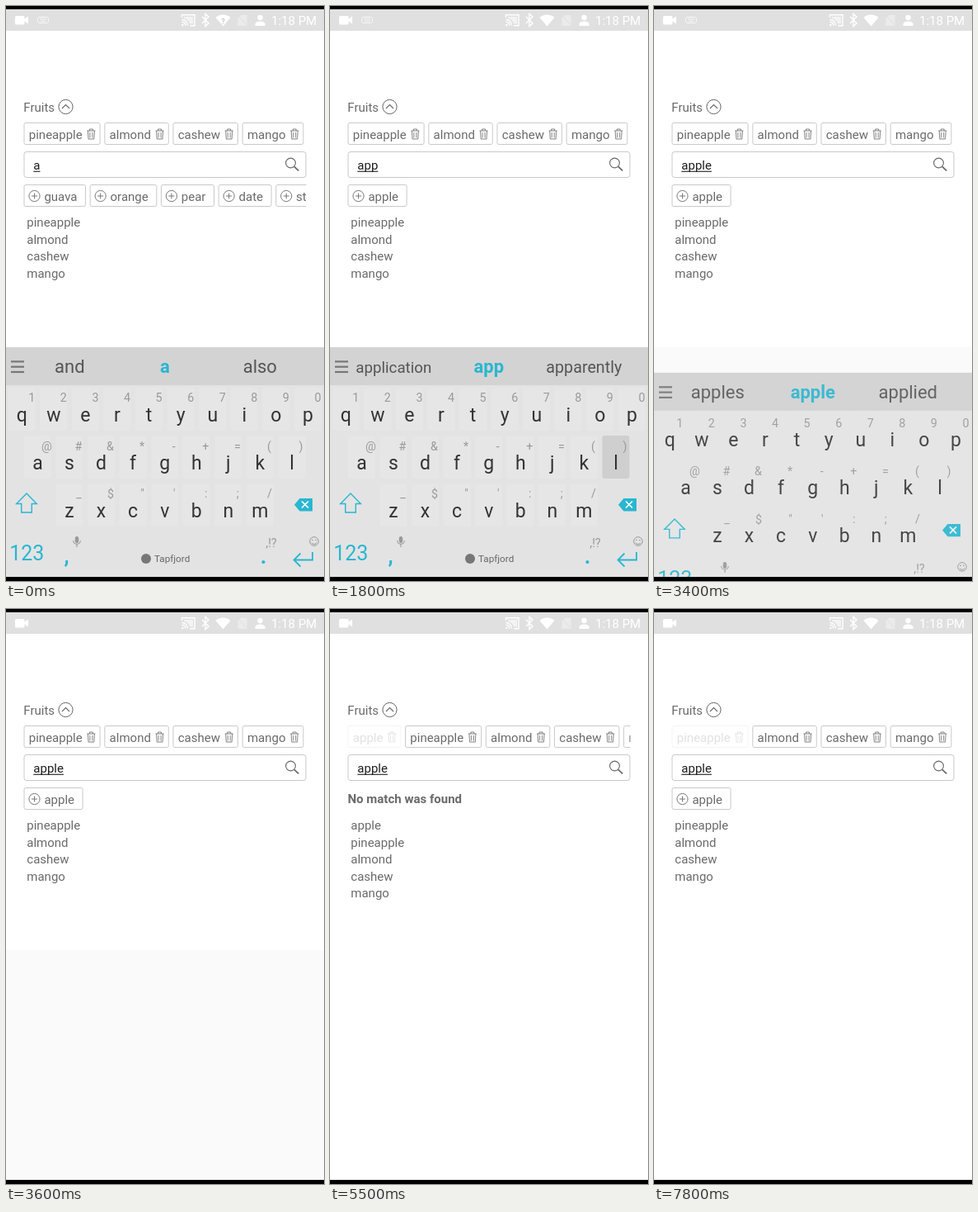
Recreate the animation shown at these times as an HTML page with a canvas. Size 386x696 px, loop 8 s.

```html
<!DOCTYPE html>
<html lang="en">
<head>
<meta charset="utf-8">
<title>Fruit picker</title>
<style>
html, body { margin: 0; width: 100%; height: 100%; overflow: hidden; background: #fff; }
canvas { display: block; width: 386px; height: 696px; }
</style>
</head>
<body>
<canvas id="stage"></canvas>
<script>
const W = 386, H = 696, LOOP = 8000, STEP = 100;
const TEAL = '#29b6d1', GREY = '#6a6a6a', LINE = '#c9c9c9';
const canvas = document.getElementById('stage');
const dpr = window.devicePixelRatio || 1;
canvas.width = W * dpr;
canvas.height = H * dpr;
const c = canvas.getContext('2d');

// Each track is a list of [start, value]; the latest start wins.
const tracks = {
  text: [[0, 'a'], [400, 'ap'], [1000, 'app'], [2000, 'appl'], [2300, 'apple']],
  caret: [[0, false], [200, true], [900, false], [1000, true], [1500, false], [2000, true], [2900, false]],
  words: [[0, ['and', 'a', 'also']], [500, ['"ap"', 'am', 'as']],
    [1100, ['application', 'app', 'apparently']], [2100, ['"appl"', 'application', 'apply']],
    [2400, ['apples', 'apple', 'applied']]],
  key: [[0, ''], [200, 'p'], [500, ''], [700, 'p'], [1000, ''], [1800, 'l'], [2100, ''], [2200, 'e'], [2400, '']],
  popup: [[0, ''], [300, 'p'], [600, ''], [800, 'p'], [1100, ''], [2000, 'l'], [2100, ''], [2200, 'e'], [2500, '']],
  offers: [[0, ['guava', 'orange', 'pear', 'date', 'strawberry']], [500, ['apple', 'grape']],
    [1100, ['apple']], [4500, []], [6000, ['apple']]],
  added: [[0, false], [4500, true], [6000, false]],
  fadeOffer: [[0, false], [4100, true], [4500, false]],
  fadeChip: [[0, false], [5500, true], [6000, false], [7800, true]]
};

function at(name, t) {
  let value;
  for (const [start, v] of tracks[name]) if (start <= t) value = v;
  return value;
}

function font(size, weight = 400) {
  c.font = `${weight} ${size}px Roboto, sans-serif`;
}

function write(s, x, y, size = 15, color = GREY, align = 'left', weight = 400) {
  font(size, weight);
  c.fillStyle = color;
  c.textAlign = align;
  c.fillText(s, x, y);
}

function textWidth(s, size = 15, weight = 400) {
  font(size, weight);
  return c.measureText(s).width;
}

function rect(x, y, w, h, color) {
  c.fillStyle = color;
  c.fillRect(x, y, w, h);
}

function round(x, y, w, h, r, fill, stroke) {
  c.beginPath();
  c.roundRect(x, y, w, h, r);
  paint(fill, stroke);
}

function circle(x, y, r, fill, stroke, width = 1) {
  c.beginPath();
  c.arc(x, y, r, 0, 7);
  paint(fill, stroke, width);
}

function paint(fill, stroke, width = 1) {
  if (fill) { c.fillStyle = fill; c.fill(); }
  if (stroke) { c.strokeStyle = stroke; c.lineWidth = width; c.stroke(); }
}

function path(d, fill, stroke, width = 1) {
  const p = new Path2D(d);
  if (fill) { c.fillStyle = fill; c.fill(p); }
  if (stroke) { c.strokeStyle = stroke; c.lineWidth = width; c.stroke(p); }
}

function statusBar(t) {
  rect(0, 0, W, 30, '#e0e0e0');
  rect(0, 0, W, 4, '#000');
  round(11, 12, 11.5, 10.5, 1.5, '#fff');
  path('M22 16l5-3.5v9l-5-3.5z', '#fff');
  if (t < 3500) {
    round(38.5, 13.5, 13, 7, 2, null, '#f6f6f6');
    path('M41 16h8M42 18.5h6', null, '#f6f6f6', 1);
  }
  path('M213.5 14v-3.3h15.5v13h-6M213.5 16.5a7 7 0 0 1 7 7M213.5 19.3a4.5 4.5 0 0 1 4.5 4.5', null, '#fff', 1.4);
  path('M216 13h11v8.5h-4a9 9 0 0 0-7-6.5z', '#f3f3f3');
  circle(214.3, 23, 1.3, '#fff');
  path('M238 13l8 8-4 3.6v-15l4 3.4-8 8', null, '#fff', 1.4);
  path('M254.5 14a13 13 0 0 1 18 0l-9 10.5z', '#fff');
  if (t < 1300) write('?', 263.5, 22, 9, '#c9c9c9', 'center', 700);
  path('M285 11h7.5v13h-11v-9.5z', '#ebebeb');
  path('M283 13l9 10', null, '#e0e0e0', 1);
  circle(308.5, 14, 3.2, '#fff');
  path('M302.5 24v-2.5q1-3 6-3t6 3v2.5z', '#fff');
  write('1:18 PM', 322, 22.7, 15, '#fff');
}

function trash(x, y) {
  path(`M${x - 5} ${y - 4}h10M${x - 2} ${y - 4}v-2h4v2M${x - 4} ${y - 4}l.6 10h6.8l.6-10M${x - 1.5} ${y - 2}v6.5M${x + 1.5} ${y - 2}v6.5`,
    null, '#777', 0.9);
}

function chips(t) {
  const names = ['pineapple', 'almond', 'cashew', 'mango'];
  if (at('added', t)) names.unshift('apple');
  c.save();
  c.beginPath();
  c.rect(21, 138, 343.5, 108);
  c.clip();
  let x = 22;
  names.forEach((name, i) => {
    const w = textWidth(name) + 27.2;
    c.globalAlpha = i === 0 && at('fadeChip', t) ? 0.2 : 1;
    round(x, 141.5, w, 26, 2, '#fff', LINE);
    write(name, x + 5.8, 160.5);
    trash(x + w - 10.7, 155);
    x += w + 5.7;
  });
  x = 22;
  for (const name of at('offers', t)) {
    const w = textWidth(name) + 34.5;
    c.globalAlpha = at('fadeOffer', t) ? 0.2 : 1;
    round(x, 216.5, w, 26, 2, '#fff', LINE);
    circle(x + 12.5, 230, 6.6, null, '#777');
    path(`M${x + 9} 230h7M${x + 12.5} 226.5v7`, null, '#777');
    write(name, x + 24.4, 235.5);
    x += w + 5.6;
  }
  c.restore();
  if (!at('offers', t).length) write('No match was found', 21.5, 235.3, 15, GREY, 'left', 700);
  names.forEach((name, i) => write(name, 25.3, 267.3 + i * 20.4));
}

function form(t) {
  write('Fruits', 21.3, 127.5);
  circle(72.5, 122, 8.6, null, '#666');
  path('M68 124l4.5-4.5 4.5 4.5', null, '#666', 1.1);
  chips(t);
  round(22, 176.5, 342, 31, 3, '#fff', LINE);
  const text = at('text', t), w = textWidth(text);
  write(text, 33.3, 198, 15, '#1c1c1c');
  rect(33.3, 199.7, w, 1.1, '#1c1c1c');
  if (at('caret', t)) rect(33.3 + w, 182, 1.8, 20.5, '#0b9488');
  circle(345.5, 190, 5.9, null, '#666', 1.1);
  path('M349.8 194.3l5.4 5', null, '#666', 1.7);
}

const PITCH = 38.57;
const rows = [
  { keys: 'qwertyuiop', hints: '1234567890', x: 19.3, y: 462, dx: 12, dy: 17.3 },
  { keys: 'asdfghjkl', hints: '@#&*-+=()', x: 38.4, y: 520, dx: 11, dy: 17.5 },
  { keys: 'zxcvbnm', hints: '_$"\':;/', x: 77, y: 578, dx: 11.5, dy: 17 }
];

function keyPlace(letter) {
  for (const row of rows) {
    const i = row.keys.indexOf(letter);
    if (i >= 0) return [row.x + i * PITCH, row.y];
  }
}

function suggestions(words) {
  rect(0, 413, W, 46, '#d3d3d3');
  for (let i = 0; i < 3; i++) rect(6, 429.3 + i * 6.3, 16, 2.2, '#777');
  words.forEach((word, i) => {
    const main = i === 1;
    const w = textWidth(word, 22);
    const size = main ? 22 : Math.min(22, 22 * 92 / w);
    write(word, 77.3 + i * 115.5, 444, size, main ? TEAL : '#555', 'center', main ? 700 : 400);
  });
}

function bottomRow() {
  path('M25 590l12.3 12.5h-6v10.5h-12.6v-10.5h-6z', null, TEAL, 1.4);
  path('M350 603.7l6.5-7.7h15.5v15.4h-15.5z', TEAL);
  path('M359 599.5l8 8M367 599.5l-8 8', null, '#fff', 1.7);
  write('123', 4.2, 671.3, 25, TEAL);
  write(',', 73.5, 674, 25, TEAL, 'center', 700);
  round(83.8, 642, 4.4, 8, 2.2, '#999');
  path('M81.7 647a4.3 4.3 0 0 0 8.6 0M86 651.5v3.5', null, '#999', 1.1);
  circle(170, 669, 6, '#777');
  write('Tapfjord', 180, 673, 11.7, '#666');
  write(',!?', 322, 655, 14.5, '#999', 'center');
  write('.', 312.5, 675, 26, TEAL, 'center', 700);
  circle(374, 648, 5.3, null, '#999');
  circle(372, 646.5, 0.8, '#999');
  circle(376, 646.5, 0.8, '#999');
  path('M371 649.5a3.2 3.2 0 0 0 6 0', null, '#999');
  path('M372 661v9.5h-22M357.5 662.5l-8 8 8 8', null, TEAL, 1.8);
}

function keyboard(t) {
  rect(0, 413, W, 278, '#e3e3e3');
  suggestions(at('words', t));
  const pressed = at('key', t);
  for (const row of rows) {
    [...row.keys].forEach((letter, i) => {
      const x = row.x + i * PITCH;
      round(x - 16.5, row.y, 33, 52, 3, letter === pressed ? '#cfcfcf' : '#e6e6e6');
      write(letter, x, row.y + 40.5, 23, '#333', 'center');
      write(row.hints[i], x + row.dx, row.y + row.dy, 14.3, '#999', 'center');
    });
  }
  bottomRow();
  const letter = at('popup', t);
  if (letter) {
    const [kx, ky] = keyPlace(letter);
    const x = Math.min(kx - 26.7, W - 53.4);
    round(x, ky - 77, 53.4, 72, 3, TEAL);
    write(letter, x + 26.7, ky - 28.5, 33, '#fff', 'center');
  }
}

function draw(t) {
  c.setTransform(dpr, 0, 0, dpr, 0, 0);
  c.globalAlpha = 1;
  rect(0, 0, W, H, '#fff');
  if (t >= 3400 && t < 4100) rect(0, 413, W, 278, '#fafafa');
  statusBar(t);
  form(t);
  if (t < 3600) {
    // The keyboard drops away with growing speed.
    const k = Math.max(0, (t - 3300) / 300);
    c.save();
    c.globalAlpha = 1 - k * k;
    c.translate(0, 278 * k * k);
    keyboard(t);
    c.restore();
  }
  rect(0, 691, W, 5, '#000');
}

function tick() {
  const t = performance.now() % LOOP;
  draw(Math.floor(t / STEP) * STEP);
  requestAnimationFrame(tick);
}
tick();
</script>
</body>
</html>
```
